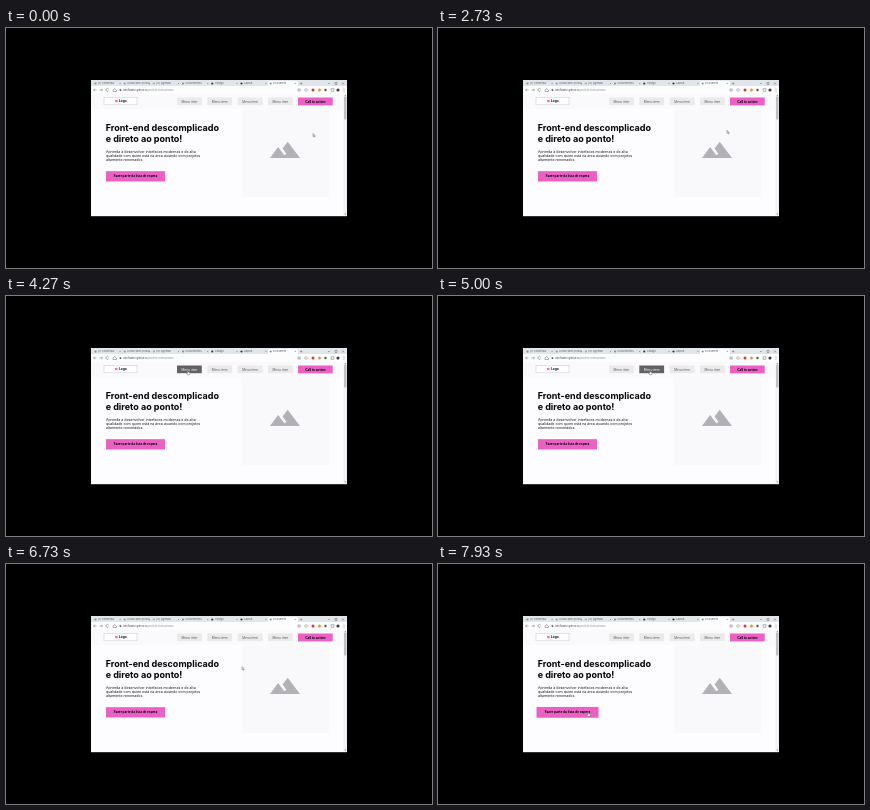
Animation, 426 px wide and 240 px high, one loop 8000 ms. Source, as an HTML page:

```html
<!DOCTYPE html>
<html lang="pt-BR">
<head>
<meta charset="utf-8">
<title>Menu hover</title>
<style>
  html, body { margin: 0; width: 100%; height: 100%; overflow: hidden; background: #000; }
  svg { display: block; width: 426px; height: 240px; font-family: Inter, sans-serif; }
  .bold { font-weight: 700; }
  .mid { text-anchor: middle; }
  .tab { font-size: 2.7px; fill: #55595e; }
</style>
</head>
<body>
<svg viewBox="0 0 426 240">
  <rect width="426" height="240"/>
  <rect x="85" y="52" width="256" height="136.200" fill="#fdfcff"/>

  <g id="browser">
    <rect x="85" y="52" width="256" height="6.500" fill="#e0e6ea"/>
    <rect x="85" y="58" width="256" height="8" fill="#fdfdfd"/>
    <path d="M262 58.500v-4q0-1.500 1.500-1.500h27q1.500 0 1.500 1.500v4z" fill="#fdfdfd"/>
    <g id="tabs"></g>
    <g fill="none" stroke="#64686c" stroke-width=".5">
      <path d="M294 55.500h2.400M295.200 54.300v2.400M322 55.500h2M329 54.500h2v2h-2zM336 54.500l2 2m0-2l-2 2"/>
      <path d="M90.500 62h-3m1.200-1.200L87.500 62l1.200 1.200M93.500 62h3m-1.200-1.200L96.500 62l-1.200 1.200"/>
      <path d="M102.600 61a1.500 1.500 0 1 0 .2 1.500M107 62l1.700-1.500 1.700 1.500v1.500H107z"/>
      <path d="M292 61h2.200v2H292zM300 60.500l1.500 1.500-1.500 1.500-1.500-1.500zM325.200 60.700h2.600v2.600h-2.600z"/>
    </g>
    <rect x="113.700" y="61.300" width="1.500" height="1.600" fill="#45494d"/>
    <text x="117" y="63" font-size="2.700" fill="#3c4044">devfulano.github.io<tspan fill="#85898d">/projeto-menu/index</tspan></text>
    <g>
      <circle cx="307" cy="62" r="1.500" fill="#cf3848"/>
      <circle cx="313.500" cy="62" r="1.500" fill="#df9a3a"/>
      <circle cx="319.500" cy="62" r="1.200" fill="#50545a"/>
      <circle cx="332" cy="62" r="1.600" fill="#4a3a3c"/>
      <path d="M338 60.500v3" stroke="#50545a" stroke-width=".6" stroke-dasharray=".7 .45"/>
    </g>
  </g>

  <g id="page">
    <rect x="85" y="66" width="252.500" height="15" fill="#fafafd"/>
    <rect x="337.500" y="66.500" width="3.500" height="121.500" fill="#f3f3f5"/>
    <rect x="338" y="69" width="2.500" height="22.500" fill="#c1c1c5"/>
    <path d="M338.300 68.300l1-1.200 1 1.200zM338.300 185.500l1 1.200 1-1.200z" fill="#77777b"/>

    <rect x="98" y="69.300" width="33" height="7.500" fill="#fff" stroke="#c9c3cf" stroke-width=".5"/>
    <circle cx="110.300" cy="73" r="1.300" fill="#ea60c4"/>
    <text class="bold" x="113" y="74.200" font-size="3.200">Logo</text>
    <g id="nav"></g>

    <g class="bold" font-size="9" fill="#000">
      <text x="99.700" y="102.800">Front-end descomplicado</text>
      <text x="99.700" y="114">e direto ao ponto!</text>
    </g>
    <g font-size="3.550" fill="#1c1c20">
      <text x="100" y="125">Aprenda a desenvolver interfaces modernas e de alta</text>
      <text x="100" y="129.100">qualidade com quem está na área atuando com projetos</text>
      <text x="100" y="133.200">altamente renomados.</text>
    </g>

    <rect x="235.500" y="81" width="87.500" height="88" fill="#f9f9fc"/>
    <path transform="translate(262.600 105.450) scale(1.364)" fill="#b1b1b6"
      d="M14 6l-3.750 5 2.850 3.800-1.600 1.200C9.810 13.750 7 10 7 10l-6 8h22z"/>
  </g>

  <g id="cursor" stroke="#444" stroke-width=".4" stroke-linejoin="round" fill="#fff">
    <path id="arrow" d="M0 0v3l.7-.6.6 1.200.6-.3-.5-1.100h.9z"/>
    <path id="hand" d="M-.4 0h.8v1.500l1.700.5v1.300l-.5 1h-2l-1.200-1.700.5-.4.7.6z"/>
  </g>
</svg>

<script>
const LOOP = 8000, STEP = 1000 / 15;
const PINK = '#ea60c4';
const $ = id => document.getElementById(id);

function add(parent, tag, attrs, text) {
  const el = document.createElementNS('http://www.w3.org/2000/svg', tag);
  for (const k in attrs) el.setAttribute(k, attrs[k]);
  if (text) el.textContent = text;
  return parent.appendChild(el);
}

[['(1) Conversa', '#45b65c'], ['Curso web (novo)', '#8e9aa6'], ['(3) Agenda', '#8fb7a0'],
 ['Documentos', '#6f9a86'], ['Código', '#33373b'], ['Layout', '#33373b'], ['Document', '#8c9094']
].forEach(([label, color], i) => {
  const x = 88.5 + i * 29.2;
  add($('tabs'), 'circle', { cx: x + 1, cy: 55.5, r: 1.1, fill: color });
  add($('tabs'), 'text', { x: x + 3.4, y: 56.4, class: 'tab' }, label);
  add($('tabs'), 'path', {
    d: `M${x + 25} 54.900l1.200 1.200m0-1.200l-1.200 1.200`, stroke: '#55595e', 'stroke-width': .35
  });
});

// Buttons: position, size, label and hover style
function button(parent, x, y, w, h, label, size, menu) {
  const g = add(parent, 'g', {});
  const box = add(g, 'rect', { x, y, width: w, height: h });
  const text = add(g, 'text', {
    x: x + w / 2, y: y + h / 2 + size * .36, 'font-size': size, class: menu ? 'mid' : 'mid bold'
  }, label);
  if (!menu) box.setAttribute('fill', PINK);
  return { g, box, text, x, y, w, h, menu };
}

const buttons = [171, 201.3, 231.7, 262].map(x =>
  button($('nav'), x, 69.5, 24.8, 7.7, 'Menu item', 3.2, true));
buttons.push(
  button($('nav'), 292, 69.5, 34.7, 7.9, 'Call to action', 3.2),
  button($('page'), 100, 143.2, 59, 10.3, 'Fazer parte da lista de espera', 3.05));

// Pointer track: time, x, y
const track = [
  [0, 307, 105.5], [270, 301, 105], [500, 301, 105], [600, 299, 104.6], [830, 299, 104.6],
  [930, 297, 104], [1080, 297, 104], [1400, 289, 102.3], [2670, 289, 102.3], [3400, 166, 77.3],
  [3600, 163, 76], [3750, 163, 76], [4300, 182, 74.5], [5000, 212, 74.5], [5350, 243, 74.5],
  [5730, 273, 74.5], [6100, 306, 74.5], [6730, 234, 103.5], [7500, 149, 148], [8000, 150.5, 148.3]
];

function pointer(t) {
  const i = Math.max(1, track.findIndex(k => k[0] >= t));
  const [t0, x0, y0] = track[i - 1], [t1, x1, y1] = track[i];
  const p = Math.max(0, (t - t0) / (t1 - t0)), e = p * p * (3 - 2 * p);
  return [x0 + (x1 - x0) * e, y0 + (y1 - y0) * e];
}

const inside = (b, [x, y]) => x >= b.x && x <= b.x + b.w && y >= b.y && y <= b.y + b.h;
const gray = (a, b, p) => { const v = Math.round(a + (b - a) * p); return `rgb(${v},${v},${v})`; };

function draw(now) {
  const t = Math.floor((now % LOOP) / STEP + .01) * STEP;
  const pos = pointer(t);
  const recent = [pos, pointer(Math.max(0, t - STEP)), pointer(Math.max(0, t - 2 * STEP))];
  for (const b of buttons) {
    const level = recent.filter(p => inside(b, p)).length / recent.length;
    if (b.menu) {
      b.box.setAttribute('fill', gray(234, 98, level));
      b.text.setAttribute('fill', gray(90, 255, level));
    } else {
      const cx = b.x + b.w / 2, cy = b.y + b.h / 2, s = 1 + .05 * level;
      b.g.setAttribute('transform', `translate(${cx} ${cy}) scale(${s}) translate(${-cx} ${-cy})`);
    }
  }
  const over = buttons.some(b => inside(b, pos));
  $('arrow').style.display = over ? 'none' : '';
  $('hand').style.display = over ? '' : 'none';
  $('cursor').setAttribute('transform', `translate(${pos[0]} ${pos[1]})`);
}

const start = performance.now();
function tick() {
  draw(performance.now() - start);
  requestAnimationFrame(tick);
}
tick();
</script>
</body>
</html>
```
